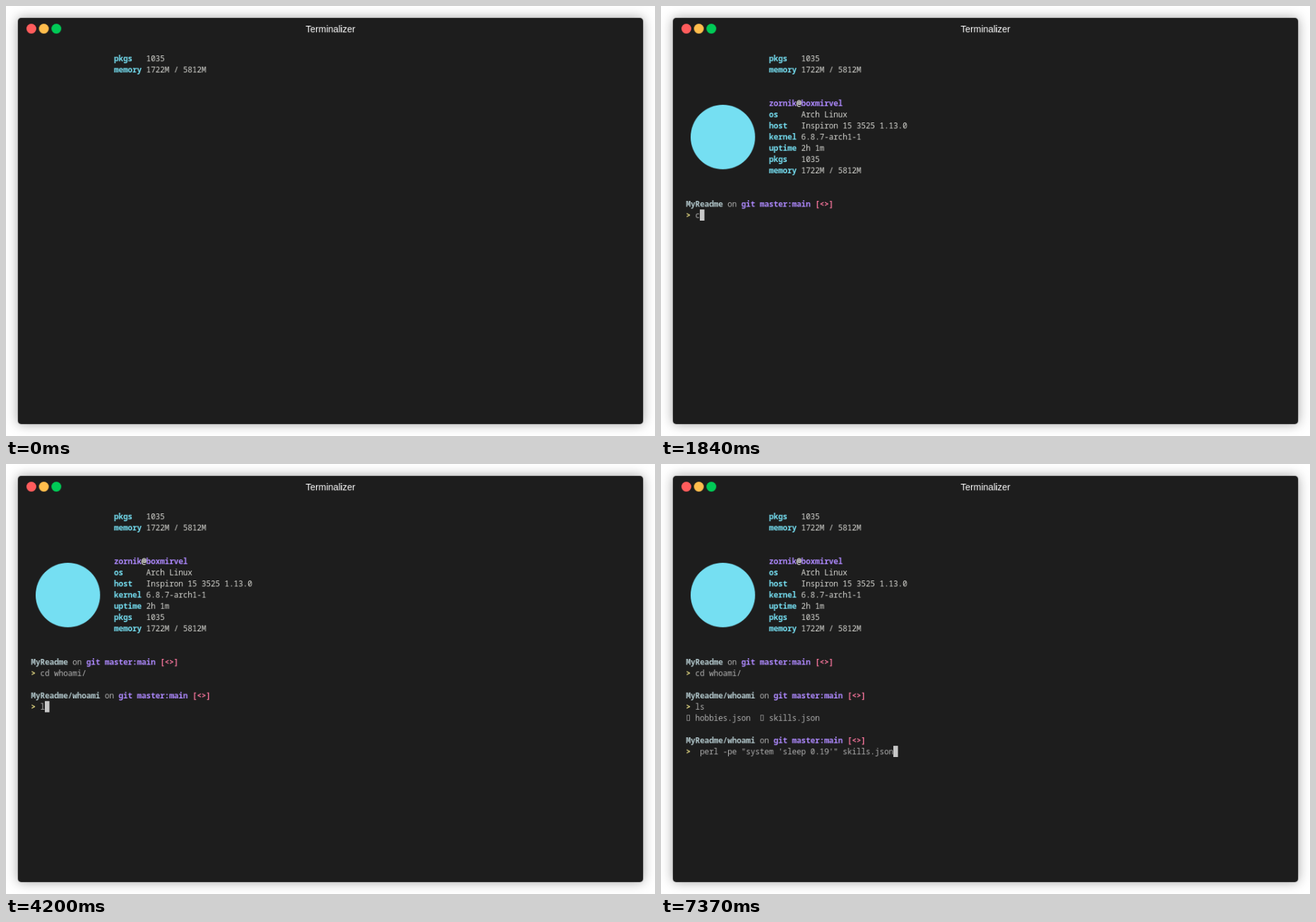
Write an HTML page that moves like this. It is 919 px wide and 609 px high and loops after 8 s.

```html
<!DOCTYPE html>
<html lang="en">
<head>
<meta charset="utf-8">
<title>Terminal</title>
<style>
:root { --loop: 8s step-end infinite; }
html, body { margin: 0; width: 100%; height: 100%; overflow: hidden; background: #fff; }
/* Laid out on a whole-pixel 7 x 17 cell grid, then scaled to the page. */
.stage {
  position: absolute; left: 0; top: 0; width: 986px; height: 653px;
  overflow: hidden; background: #fff;
  transform-origin: 0 0; transform: scale(calc(919 / 986), calc(609 / 653));
  will-change: transform;
}
.window {
  position: absolute; left: 18px; top: 18px; width: 950px; height: 617px;
  border-radius: 5px; background: #1d1d1d; box-shadow: 0 0 18px rgba(0, 0, 0, .35);
}
.title {
  position: absolute; left: 0; top: 18px; width: 986px;
  text-align: center; color: #fff; font: 14px/34px "Liberation Sans", Arial, sans-serif;
}
.dot { position: absolute; top: 27px; width: 15px; height: 15px; border-radius: 50%; }
.logo {
  position: absolute; left: 45px; top: 150px; width: 98px; height: 98px;
  border-radius: 50%; background: #75dff2;
}
.screen { position: absolute; left: 38px; top: 71px; }
pre {
  margin: 0; color: #afafaf;
  font: 12px/17px "Noto Sans Mono", monospace;
  letter-spacing: calc(7px - 1ch);
}
b { color: #75dff2; }
i { font-style: normal; color: #d5d5d0; }
.user { color: #ae89fe; }
.at { color: #f9f9f4; }
.dir { color: #b1c6ca; }
.flag { color: #fd779f; }
.mark { color: #ebdf86; }
.file {
  display: inline-block; box-sizing: border-box; width: 5px; height: 9px;
  margin: 0 1px; border: 1px solid #8c8c8c;
}
.cursor, .paste { position: absolute; width: 7px; height: 17px; }
.cursor { background: #c7c7c7; animation: cursor var(--loop); }
.paste {
  left: 14px; top: 357px; width: 301px; background: #afafaf;
  animation: paste var(--loop);
}

/* Each reveal holds hidden until its moment in the 8 s loop. */
.logo    { animation: logo var(--loop); }
.info    { animation: info var(--loop); }
.prompt1 { animation: prompt1 var(--loop); }
.key1    { animation: key1 var(--loop); }
.key2    { animation: key2 var(--loop); }
.key3    { animation: key3 var(--loop); }
.key4    { animation: key4 var(--loop); }
.key5    { animation: key5 var(--loop); }
.key6    { animation: key6 var(--loop); }
.prompt2 { animation: prompt2 var(--loop); }
.key7    { animation: key7 var(--loop); }
.key8    { animation: key8 var(--loop); }
.list    { animation: list var(--loop); }
.prompt3 { animation: prompt3 var(--loop); }
.command { animation: command var(--loop); }
@keyframes logo    { 0% { visibility: hidden } 1.25%, 100% { visibility: visible } }
@keyframes info    { 0% { visibility: hidden } 2%, 100% { visibility: visible } }
@keyframes prompt1 { 0% { visibility: hidden } 5.75%, 100% { visibility: visible } }
@keyframes key1    { 0% { visibility: hidden } 23%, 100% { visibility: visible } }
@keyframes key2    { 0% { visibility: hidden } 23.625%, 100% { visibility: visible } }
@keyframes key3    { 0% { visibility: hidden } 24.625%, 100% { visibility: visible } }
@keyframes key4    { 0% { visibility: hidden } 29.125%, 100% { visibility: visible } }
@keyframes key5    { 0% { visibility: hidden } 30.25%, 100% { visibility: visible } }
@keyframes key6    { 0% { visibility: hidden } 37.75%, 100% { visibility: visible } }
@keyframes prompt2 { 0% { visibility: hidden } 45.5%, 100% { visibility: visible } }
@keyframes key7    { 0% { visibility: hidden } 52.5%, 100% { visibility: visible } }
@keyframes key8    { 0% { visibility: hidden } 56.375%, 100% { visibility: visible } }
@keyframes list    { 0% { visibility: hidden } 57.25%, 100% { visibility: visible } }
@keyframes prompt3 { 0% { visibility: hidden } 58.125%, 100% { visibility: visible } }
@keyframes command { 0% { visibility: hidden } 92.125%, 100% { visibility: visible } }
@keyframes paste {
  0% { visibility: hidden }
  83.125% { visibility: visible }
  92.125%, 100% { visibility: hidden }
}
@keyframes cursor {
  0%      { visibility: hidden; left: 0; top: 204px }
  2.75%   { visibility: visible; left: 0; top: 204px }
  5.75%   { visibility: visible; left: 14px; top: 238px }
  23%     { visibility: visible; left: 21px; top: 238px }
  23.625% { visibility: visible; left: 28px; top: 238px }
  24.625% { visibility: visible; left: 35px; top: 238px }
  29.125% { visibility: visible; left: 42px; top: 238px }
  30.25%  { visibility: visible; left: 49px; top: 238px }
  37.75%  { visibility: visible; left: 84px; top: 238px }
  43.75%  { visibility: visible; left: 0; top: 255px }
  45.5%   { visibility: visible; left: 14px; top: 289px }
  52.5%   { visibility: visible; left: 21px; top: 289px }
  56.375% { visibility: visible; left: 28px; top: 289px }
  57.25%  { visibility: visible; left: 0; top: 323px }
  58.125% { visibility: visible; left: 14px; top: 357px }
  83.125%, 100% { visibility: visible; left: 315px; top: 357px }
}
</style>
</head>
<body>
<div class="stage">
<div class="window"></div>
<div class="dot" style="left:31px;background:#ff5c5c"></div>
<div class="dot" style="left:50px;background:#ffbd4c"></div>
<div class="dot" style="left:69px;background:#00ca56"></div>
<div class="title">Terminalizer</div>
<div class="logo"></div>
<div class="screen">
<div class="paste"></div>
<div class="cursor"></div>
<pre>                  <b>pkgs</b>   <i>1035</i>
                  <b>memory</b> <i>1722M / 5812M</i>


<span class="info">                  <b class="user">zornik</b><b class="at">@</b><b class="user">boxmirvel</b>
                  <b>os</b>     <i>Arch Linux</i>
                  <b>host</b>   <i>Inspiron 15 3525 1.13.0</i>
                  <b>kernel</b> <i>6.8.7-arch1-1</i>
                  <b>uptime</b> <i>2h 1m</i>
                  <b>pkgs</b>   <i>1035</i>
                  <b>memory</b> <i>1722M / 5812M</i></span>


<span class="prompt1"><b class="dir">MyReadme</b> on <b class="user">git master:main</b> <b class="flag">[&lt;&gt;]</b>
<b class="mark">&gt;</b> </span><span class="key1">c</span><span class="key2">d</span><span class="key3"> </span><span class="key4">w</span><span class="key5">h</span><span class="key6">oami/</span>

<span class="prompt2"><b class="dir">MyReadme/whoami</b> on <b class="user">git master:main</b> <b class="flag">[&lt;&gt;]</b>
<b class="mark">&gt;</b> </span><span class="key7">l</span><span class="key8">s</span>
<span class="list"><span class="file"></span> hobbies.json  <span class="file"></span> skills.json</span>

<span class="prompt3"><b class="dir">MyReadme/whoami</b> on <b class="user">git master:main</b> <b class="flag">[&lt;&gt;]</b>
<b class="mark">&gt;</b> </span><span class="command"> perl -pe "system 'sleep 0.19'" skills.json</span></pre>
</div>
</div>
</body>
</html>
```
